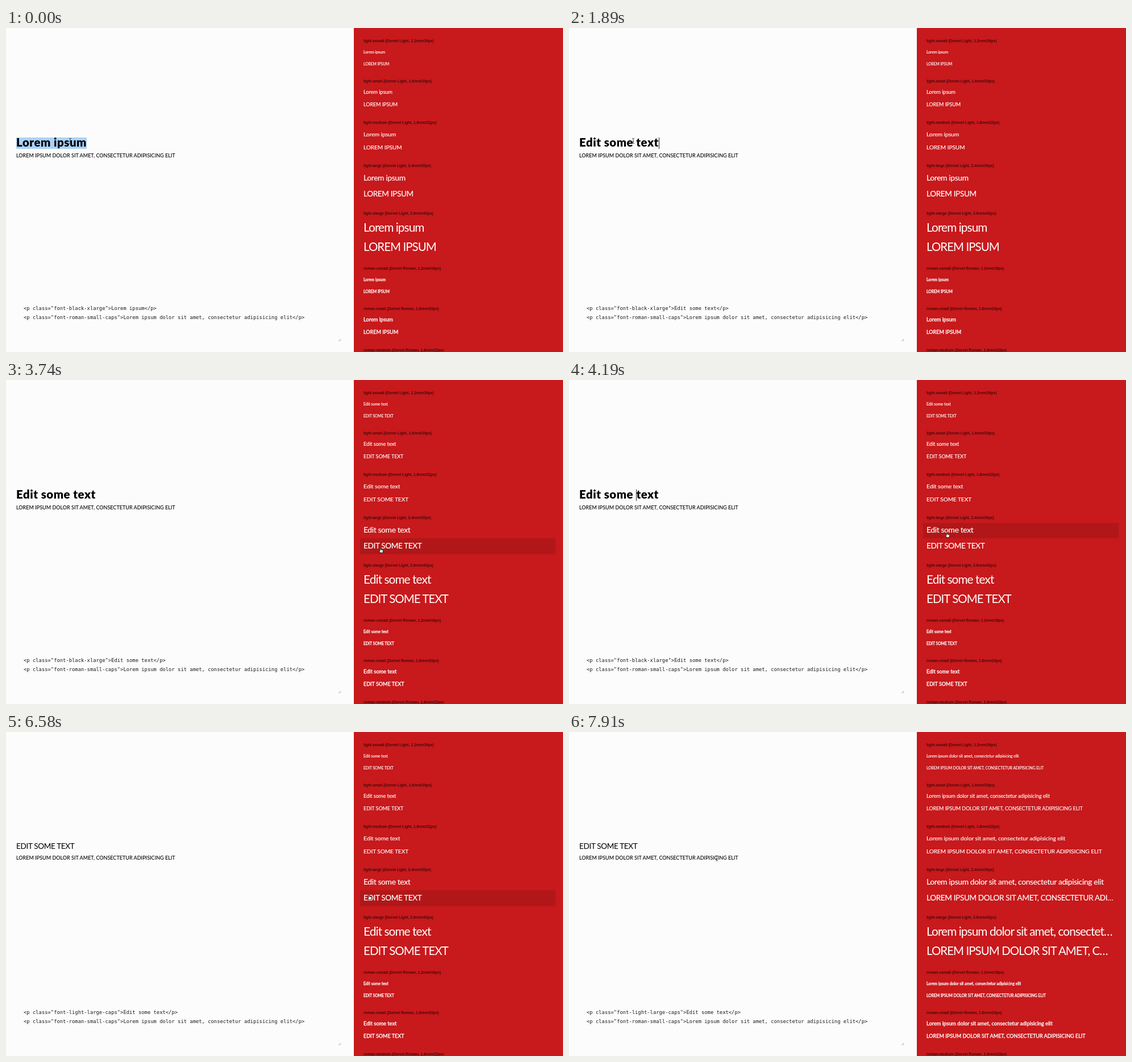
Write an HTML page that moves like this. It is 980 px wide and 571 px high and loops after 8 s.

```html
<!DOCTYPE html>
<html lang="en">
<head>
<meta charset="utf-8">
<title>Type styles</title>
<style>
  html, body { margin: 0; width: 100%; height: 100%; overflow: hidden; background: #fcfcfc; }
  body { position: relative; font-family: Lato, sans-serif; }
  div, svg { position: absolute; white-space: pre; }
  #panel { left: 612px; top: 0; width: 368px; height: 571px; background: #c8191c; color: #fff; overflow: hidden; }
  #hover { left: 11px; width: 344px; height: 27.5px; background: #b11719; }
  .row { left: 17px; line-height: 30px; margin-top: -15px; }
  .label { font: bold 6.64px/30px "Liberation Sans", Arial, sans-serif; color: rgba(0, 0, 0, .65); }
  .code { left: 31px; font: 8.84px/16px "DejaVu Sans Mono", monospace; color: #1c1c1c; }
  #head, #sub { left: 18px; line-height: 16px; color: #000; }
  #head { top: 193px; height: 20px; }
  #head.picked { background: #abd2f8; }
  #head i { position: absolute; width: 1px; height: 20px; background: #222; }
  #mouse { left: 0; top: 0; overflow: visible; }

  .light { letter-spacing: -.008em; }
  .roman { font-weight: 500; }
  .row.light:not(.xlarge) { -webkit-text-stroke: .15px; }
  .row.roman { -webkit-text-stroke: .3px; }
  .xsmall { font-size: 6.92px; }
  .small { font-size: 9.23px; }
  .medium { font-size: 10.38px; }
  .large { font-size: 13.85px; letter-spacing: -.026em; }
  .xlarge { font-size: 20.8px; letter-spacing: -.044em; }
  .xsmall.caps { font-size: 6.78px; }
  .small.caps { font-size: 9.03px; }
  .medium.caps { font-size: 10.15px; }
  .large.caps { font-size: 13.57px; }
  .xlarge.caps { font-size: 20.4px; }
  .caps { text-transform: uppercase; }
  .black { font-weight: 900; }
  .black.xlarge { font-size: 20.4px; letter-spacing: .026em; }
</style>
</head>
<body>
<div id="head"></div>
<div id="sub" class="roman small caps"></div>
<div id="code1" class="code" style="top:486px"></div>
<div id="code2" class="code" style="top:502px"></div>
<svg width="6" height="6" style="left:584px;top:547px"><path d="M1 5L5 1M3.2 5L5 3.2" stroke="#999" stroke-width=".8"/></svg>
<div id="panel"><div id="hover"></div></div>
<svg id="mouse" width="1" height="1"><path/></svg>
<script>
const $ = id => document.getElementById(id);
const LONG = 'Lorem ipsum dolor sit amet, consectetur adipisicing elit';
const LOOP = 8000;

// weight, size, metrics, then the heights of label, plain line and caps line
const STYLES = [
  ['light', 'xsmall', '1.2rem/16px', 23, 42, 63],
  ['light', 'small', '1.6rem/20px', 94, 113, 135],
  ['light', 'medium', '1.8rem/22px', 167, 187, 210],
  ['light', 'large', '2.4rem/30px', 242.5, 264, 291.5],
  ['light', 'xlarge', '3.6rem/42px', 326.5, 351, 384.5],
  ['roman', 'xsmall', '1.2rem/16px', 424, 443, 464],
  ['roman', 'small', '1.6rem/20px', 495, 514, 536],
  ['roman', 'medium', '1.8rem/22px', 568],
];
// characters that fit before the ellipsis
const FIT = { 'large caps': 43, 'xlarge': 37, 'xlarge caps': 29 };

const samples = [];
function addRow(cls, y, text) {
  const row = document.createElement('div');
  row.className = 'row ' + cls;
  row.style.top = y + 'px';
  row.textContent = text;
  $('panel').append(row);
  return row;
}
for (const [weight, size, metrics, labelY, ...lines] of STYLES) {
  const font = 'Dorvel ' + weight[0].toUpperCase() + weight.slice(1);
  addRow('label', labelY, `${weight}-${size} (${font}, ${metrics})`);
  lines.forEach((y, i) => {
    const kind = size + (i ? ' caps' : '');
    samples.push({ row: addRow(`${weight} ${kind}`, y, ''), fit: FIT[kind] || 99 });
  });
}

const SHAPES = {
  beam: { d: 'M-2-4.5Q0-4.5 0-3.5Q0-4.5 2-4.5M0-3.5V3.5M-2 4.5Q0 4.5 0 3.5Q0 4.5 2 4.5M-1 1H1', fill: 'none', stroke: '#333', 'stroke-width': .9 },
  arrow: { d: 'M0 0V8.6L2 6.8L3.4 10L4.8 9.4L3.4 6.3H6.2Z', fill: '#000', stroke: '#fff', 'stroke-width': .6 },
  hand: { d: 'M-1.8-4Q-1-5-.3-4V-1L2.8-.4Q3.6 0 3.4 1L2.6 4.6H-1.2L-3.6 1Q-3.4 0-1.8 1Z', fill: '#fff', stroke: '#111', 'stroke-width': .8 },
};

// '|' marks the caret; each entry changes the state from its time on
const EVENTS = [
  [0, { head: 'Lorem ipsum', picked: true, look: 'black-xlarge', sample: 'Lorem ipsum', mouse: ['beam', 113, 199], hover: 0 }],
  [150, { head: 'E|', picked: false }],
  [345, { head: 'Edit|' }],
  [540, { head: 'Edit |' }],
  [990, { head: 'Edit s|' }],
  [1140, { head: 'Edit som|' }],
  [1290, { head: 'Edit some|' }],
  [1440, { head: 'Edit some |' }],
  [1590, { head: 'Edit some t|' }],
  [1740, { head: 'Edit some tex|' }],
  [1890, { head: 'Edit some text|' }],
  [2190, { head: 'Edit some text', mouse: ['arrow', 112, 238] }],
  [2330, { mouse: ['arrow', 114, 250] }],
  [2630, { mouse: ['arrow', 116, 246] }],
  [2780, { sample: 'Edit some text', mouse: ['beam', 118, 212] }],
  [2930, { head: 'Edit some |text', mouse: ['beam', 121, 206] }],
  [3080, { mouse: ['beam', 122, 205] }],
  [3380, { mouse: ['beam', 201, 207] }],
  [3590, { mouse: ['arrow', 440, 262] }],
  [3740, { head: 'Edit some text', mouse: ['hand', 660, 300], hover: 279.3 }],
  [4040, { mouse: ['hand', 665, 285] }],
  [4190, { head: 'Edit some |text', mouse: ['hand', 666, 273], hover: 251.5 }],
  [4490, { head: 'Edit some text', look: 'light-large' }],
  [5240, { mouse: ['hand', 666, 283], hover: 279.3 }],
  [5380, { mouse: ['hand', 665, 292] }],
  [5830, { look: 'light-large-caps' }],
  [6580, { mouse: ['hand', 640, 291] }],
  [6730, { mouse: ['arrow', 557, 281], hover: 0 }],
  [6880, { mouse: ['arrow', 394, 262] }],
  [7020, { mouse: ['arrow', 294, 236] }],
  [7170, { mouse: ['beam', 272, 226] }],
  [7310, { mouse: ['beam', 263, 223] }],
  [7460, { mouse: ['beam', 260, 222.5] }],
  [7760, { sample: LONG }],
];

const tag = (look, text) => `<p class="font-${look}">${text}</p>`;
$('sub').textContent = LONG;
$('code2').textContent = tag('roman-small-caps', LONG);

function draw({ head, picked, look, sample, mouse: [shape, x, y], hover }) {
  $('head').className = look.replaceAll('-', ' ') + (picked ? ' picked' : '');
  $('head').innerHTML = head.replace('|', '<i></i>');
  $('sub').style.top = (look === 'black-xlarge' ? 216.7 : 213.5) + 'px';
  $('code1').textContent = tag(look, head.replace('|', '').replace(/ $/, '&nbsp;'));

  for (const { row, fit } of samples)
    row.textContent = sample.length > fit ? sample.slice(0, fit) + '…' : sample;
  $('hover').style.top = hover + 'px';
  $('hover').hidden = !hover;

  const path = $('mouse').firstChild;
  for (const [key, value] of Object.entries(SHAPES[shape])) path.setAttribute(key, value);
  path.setAttribute('transform', `translate(${x} ${y})`);
}

let shown = 0;
function tick(now) {
  const t = now % LOOP;
  const past = EVENTS.filter(([start]) => start <= t);
  if (past.length !== shown) {
    shown = past.length;
    draw(Object.assign({}, ...past.map(([, change]) => change)));
  }
  requestAnimationFrame(tick);
}
tick(0);
</script>
</body>
</html>
```
